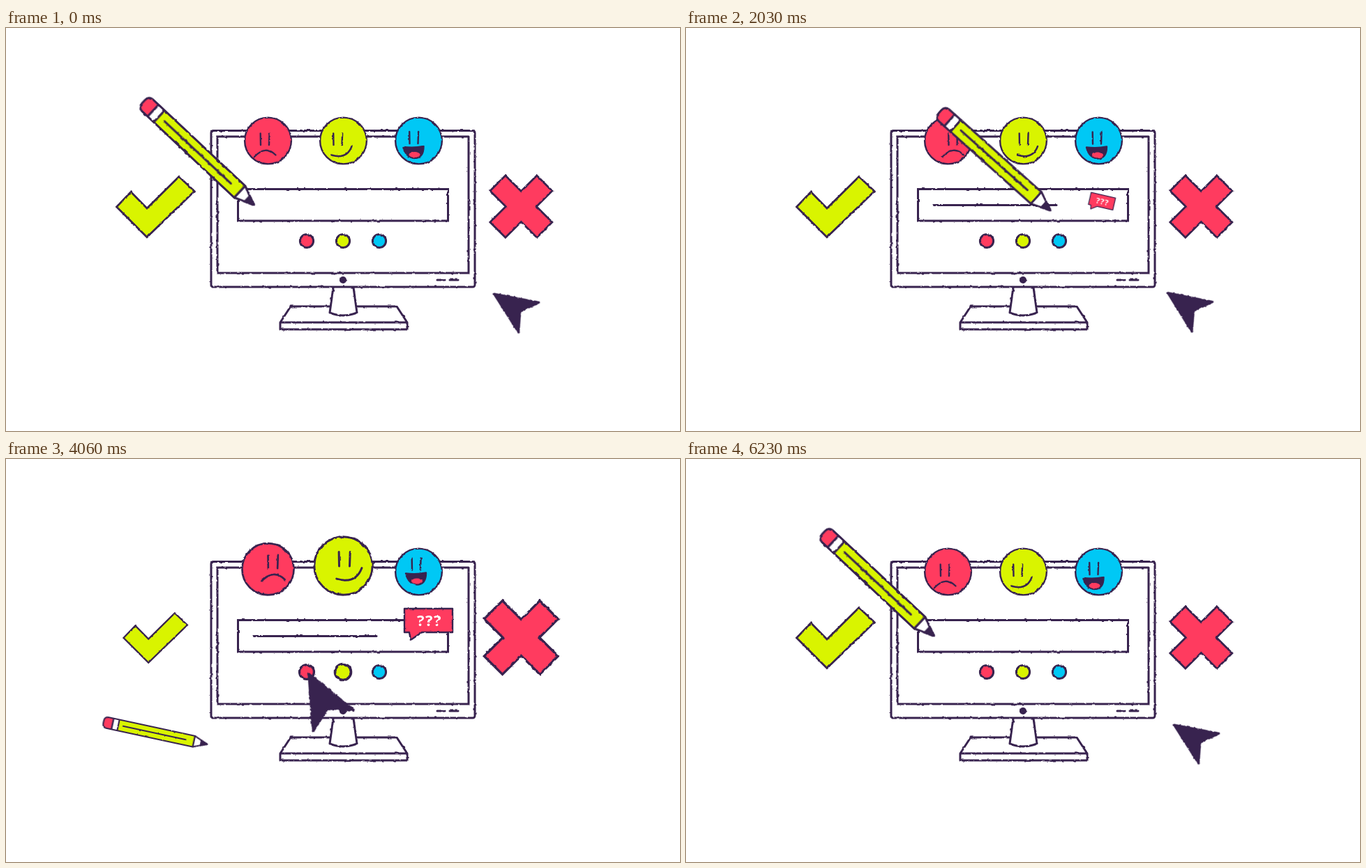
An HTML page for the animation above (6300 ms loop, 966x579 px).

```html
<!DOCTYPE html>
<html lang="en">
<head>
<meta charset="utf-8">
<title>Feedback survey</title>
<style>
  html, body { margin: 0; width: 100%; height: 100%; overflow: hidden; background: #fff; }
  svg { display: block; width: 966px; height: 579px; }
  .ink { fill: none; stroke: #38234f; stroke-linecap: round; stroke-linejoin: round; stroke-width: 3; }
  .white { fill: #fff; }
  .red { fill: #ff3b5f; }
  .lime { fill: #d9f400; }
  .blue { fill: #00c8f5; }
  .dark { fill: #38234f; }
  .sharp { stroke-linejoin: miter; stroke-width: 2.8; }
  .thin { stroke-width: 2.4; }
  text { font: bold 22px "Noto Sans", sans-serif; fill: #fff; stroke: none; letter-spacing: 1.5px; text-anchor: middle; }
</style>
</head>
<body>
<svg viewBox="0 0 966 579">
  <defs>
    <filter id="rough" x="-20%" y="-20%" width="140%" height="140%" color-interpolation-filters="sRGB">
      <feTurbulence type="fractalNoise" baseFrequency="0.16" numOctaves="2" seed="4"/>
      <feDisplacementMap in="SourceGraphic" scale="2.6" xChannelSelector="R" yChannelSelector="G"/>
    </filter>
  </defs>

  <g class="ink" filter="url(#rough)">
    <path class="white" d="M408 400H560L575 423V433H393V423Z M393 423H575"/>
    <path class="white" d="M469 373L464 409Q483 417 503 409L498 373"/>
    <rect class="white" x="294" y="147.5" width="378" height="224.5" rx="3"/>
    <rect x="303" y="156" width="360" height="196"/>
    <rect x="332.5" y="231.5" width="301" height="45.5" style="stroke-linejoin:miter"/>
    <circle class="dark" cx="483" cy="362" r="3.6"/>
    <path d="M618 362H629M636 362H648"/>
    <path id="line" d=""/>
  </g>

  <g id="dots"></g>
  <g id="faces"></g>

  <g id="check"><path class="ink lime sharp" filter="url(#rough)"
    d="M-55.5 0L-35 -21.5L-12 2L34 -43.5L56 -22.5L-12 43.5Z"/></g>
  <g id="cross"><path class="ink red sharp" filter="url(#rough)"
    d="M-22.5 -44.5L0 -22L22.5 -44.5L44.5 -22.5L22 0L44.5 22.5L22.5 44.5L0 22L-22.5 44.5L-44.5 22.5L-22 0L-44.5 -22.5Z"/></g>

  <g id="bubble"><g class="ink thin" filter="url(#rough)">
    <path class="red" d="M-9 -45H60V-11H16L0 0L-2 -11H-9Z"/>
    <text x="27" y="-20">???</text>
  </g></g>

  <g id="pencil"><g class="ink" filter="url(#rough)">
    <path class="red" d="M-199 -11.5H-210Q-218 -11 -218 -3V3Q-218 11 -210 11.5H-199Z"/>
    <rect class="white" x="-199" y="-11.5" width="12" height="23"/>
    <path class="white" d="M-29 -11.5L-1 0L-29 11.5Z"/>
    <path class="dark" d="M-14 -5L-1 0L-14 5Z"/>
    <rect class="lime" x="-187" y="-11.5" width="158" height="23"/>
    <path d="M-177 0H-46"/>
  </g></g>

  <g id="cursor"><path class="ink dark" filter="url(#rough)" d="M2 0L62 -26L47 0L62 26Z"/></g>
</svg>

<script>
const LOOP = 6300, STEP = 70;
const $ = id => document.getElementById(id);

// Smooth monotone curve through rows of [time, ...values].
function track(...keys) {
  const n = keys.length, dims = keys[0].length - 1;
  const rate = (i, k) => (keys[i + 1][k] - keys[i][k]) / (keys[i + 1][0] - keys[i][0]);
  const slope = (i, k) => {
    if (i === 0 || i === n - 1) return 0;
    const a = rate(i - 1, k), b = rate(i, k);
    return a * b <= 0 ? 0 : 2 * a * b / (a + b);
  };
  return t => {
    if (t <= keys[0][0]) return keys[0].slice(1);
    if (t >= keys[n - 1][0]) return keys[n - 1].slice(1);
    let i = 0;
    while (keys[i + 1][0] <= t) i++;
    const h = keys[i + 1][0] - keys[i][0], u = (t - keys[i][0]) / h, v = 1 - u;
    return Array.from({ length: dims }, (_, d) => {
      const k = d + 1;
      return keys[i][k] * v * v * (1 + 2 * u) + keys[i + 1][k] * u * u * (3 - 2 * u)
        + h * u * v * (v * slope(i, k) - u * slope(i + 1, k));
    });
  };
}

const faces = [
  {
    x: 375.5, dot: 431, color: 'red', eyes: [-10.5, 6],
    mouth: '<path d="M-15 23Q1 6 15.5 20.5"/>',
    gaze: track([0, -4.5, 0], [840, -1.5, 0], [2030, 7, 0], [2590, 10, -4.5], [4060, 6.3, -7],
      [5180, -.4, -9.3], [5450, -.4, -9.3], [6180, -4.5, 0]),
    size: track([3960, 1], [4060, 1.11], [4220, 1.25], [5330, 1.25], [5620, 1])
  },
  {
    x: 483.5, dot: 483, color: 'lime', eyes: [-10.5, 6],
    mouth: '<path d="M-9 20.5Q13 27 20 8"/>',
    gaze: track([0, -8, 0], [840, -4.5, 0], [2030, .5, 0], [2590, 5, -3.5], [4060, 1.2, -5.6],
      [5180, -1.5, -6], [5450, -1.5, -6], [6180, -8, 0]),
    size: track([3350, 1], [3620, 1.25], [4050, 1.25], [4320, 1])
  },
  {
    x: 591.5, dot: 535, color: 'blue', eyes: [-13, 4],
    mouth: '<path class="dark" d="M-15 9Q0 11 14 8Q14 24 2 25Q-11 25 -15 9Z"/>'
      + '<ellipse class="red" stroke="none" cx="1" cy="20" rx="8" ry="4"/>',
    gaze: track([0, -7, 0], [840, -6, 0], [2030, -2.5, .5], [2590, -1.5, -.3], [4060, -3.5, -6.5],
      [5180, -10, -6], [5450, -10, -6], [6180, -7, 0]),
    size: track([2750, 1], [3020, 1.25], [3350, 1.25], [3650, 1])
  }
];

const pencil = track(
  [0, 356, 255, 43.2, 1], [840, 436, 255, 43.2, 1], [1770, 532, 255, 43.2, 1],
  [2030, 523, 263, 41.9, .98], [2590, 360, 366, 20.2, .78], [3000, 289, 410, 12.2, .7],
  [5400, 289, 410, 12.2, .7], [5560, 285, 413, 11.5, .7], [6180, 356, 255, 43.2, 1]);
const cursor = track(
  [1880, 698, 381, 34.2, 1], [2030, 689, 379.5, 34.8, 1], [2590, 574, 336, 54.4, 1.19],
  [2900, 536, 310, 59, 1.25], [3120, 536, 310, 59, 1.25], [3430, 485, 308, 61, 1.25],
  [3720, 485, 308, 61, 1.25], [4060, 433, 307, 62.3, 1.25], [4400, 425, 301, 61.3, 1.25],
  [5180, 421, 298, 60.7, 1.25], [5450, 421, 298, 60.7, 1.25], [6180, 698, 381, 34.2, 1]);
const bubble = track(
  [1880, 0, 40], [2030, .52, 13], [2330, 1.05, -5], [2590, 1.01, -3], [2850, 1, 0],
  [4950, 1, 0], [5180, .51, 17], [5380, 0, 40]);
const lineEnd = track([0, 355], [840, 434], [1770, 531], [4900, 531], [5180, 409], [5350, 355]);
const check = track([2620, 1], [2980, 1.2], [3350, 1.2], [4060, .82], [4250, .79], [5450, .79], [5950, 1]);
const cross = track([2620, 1], [2980, .8], [3350, .8], [4060, 1.19], [4250, 1.22], [5450, 1.22], [5950, 1]);

function group(parent, html) {
  const g = document.createElementNS('http://www.w3.org/2000/svg', 'g');
  g.innerHTML = html;
  return parent.appendChild(g);
}

for (const f of faces) {
  f.dotNode = group($('dots'), `<circle class="ink ${f.color}" r="9.6" filter="url(#rough)"/>`);
  const [top, bottom] = f.eyes;
  f.node = group($('faces'), `<g class="ink thin" filter="url(#rough)">
    <circle class="${f.color}" cy="-34" r="33.4"/>
    <g class="look"><path d="M-6.3 ${top}L-6 ${bottom}M6.6 ${top}L6 ${bottom}"/>${f.mouth}</g></g>`);
  f.look = f.node.querySelector('.look');
}

function place(node, x, y, angle, scale) {
  node.setAttribute('transform', `translate(${x} ${y}) rotate(${angle}) scale(${scale})`);
}

function draw(t) {
  for (const f of faces) {
    const [s] = f.size(t), [dx, dy] = f.gaze(t);
    place(f.dotNode, f.dot, 306, 0, 1 + (s - 1) * .8);
    place(f.node, f.x, 196, 0, s);
    place(f.look, dx, dy - 34, 0, 1);
  }
  place($('pencil'), ...pencil(t));
  place($('cursor'), ...cursor(t));
  place($('check'), 214, 257, 0, check(t)[0]);
  place($('cross'), 738.3, 256.5, 0, cross(t)[0]);

  const [size, tilt] = bubble(t);
  place($('bubble'), 580, 260, tilt, size);
  $('bubble').style.display = size > .02 ? '' : 'none';

  const [end] = lineEnd(t);
  $('line').setAttribute('d', end > 356 ? `M355.5 254.5H${end}` : '');
}

const start = performance.now();
function tick() {
  const t = (performance.now() - start) % LOOP;
  draw(Math.floor(t / STEP) * STEP);
  requestAnimationFrame(tick);
}
tick();
</script>
</body>
</html>
```
